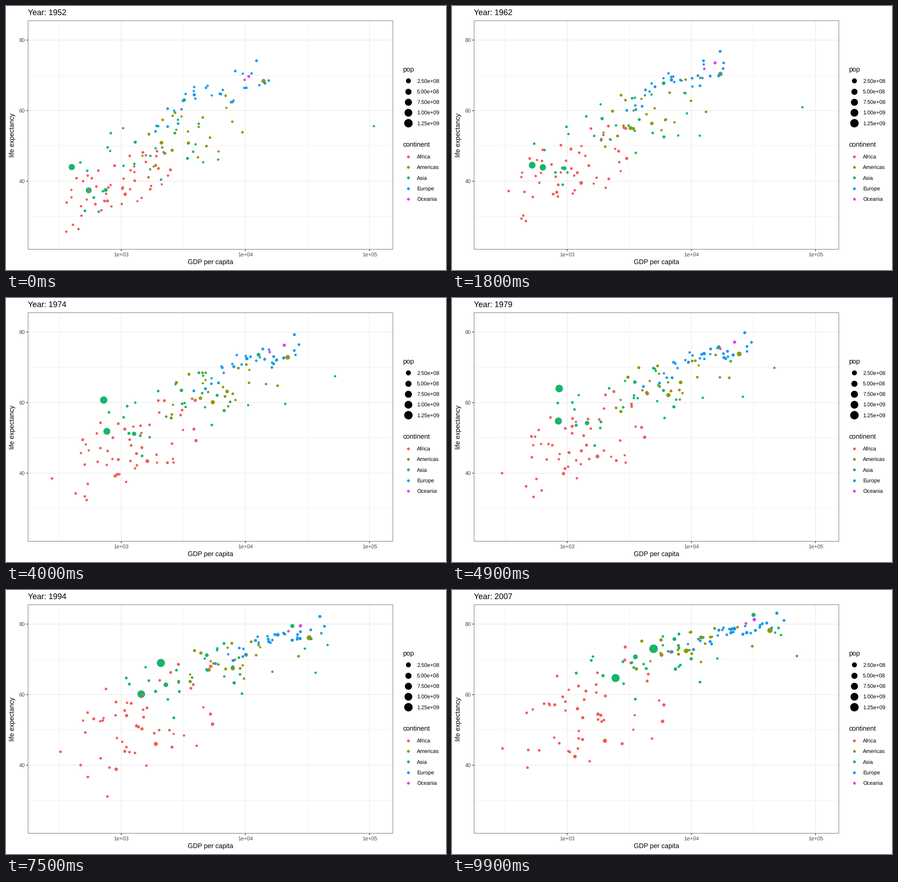
A matplotlib script for the animation above (10 s loop, 966 by 580 pixels).

```python
import numpy as np
import matplotlib.pyplot as plt
from matplotlib.animation import FuncAnimation
from matplotlib.patches import Rectangle

W, H, DPI = 966, 580, 72          # at 72 dpi one point is one pixel
FRAMES, SURVEYS = 100, 12         # nine frames from one survey to the next
LEFT, RIGHT, TOP, BOTTOM = 48.1, 849.6, 31.8, 534.8
THICK, THIN = 1.42, .71
GRID, DARK, GREY = '#EBEBEB', '#333333', '#4D4D4D'

COLORS = {
    'Africa': '#F35E5A',
    'Americas': '#929705',
    'Asia': '#17B56A',
    'Europe': '#149BF0',
    'Oceania': '#E345E8',
}

# Count, then (start, end) of mean log10 gdp, its spread, mean life, scatter.
CROWDS = {
    'Africa': (50, (2.97, 3.17), (.25, .34), (38.8, 54.5), (4.3, 7.5)),
    'Americas': (22, (3.56, 3.94), (.24, .24), (53.5, 73.5), (5, 2.7)),
    'Asia': (28, (3.19, 3.83), (.32, .45), (47, 70.5), (6.5, 4.2)),
    'Europe': (30, (3.72, 4.34), (.26, .21), (64.2, 77.7), (2.8, 1.2)),
    'Oceania': (2, (4.01, 4.47), (.01, .08), (69.2, 80.7), (.15, .1)),
}

# Largest bubbles: continent, final millions, (gdp, life) at start, middle, end.
GIANTS = [
    ('Asia', 1319, [(400, 44), (832, 64.7), (4959, 73)]),
    ('Asia', 1110, [(547, 37.4), (830, 55.3), (2452, 64.7)]),
    ('Americas', 301, [(13990, 68.4), (24400, 73.9), (42952, 78.2)]),
    ('Asia', 223, [(750, 37.5), (1440, 54.4), (3541, 70.7)]),
    ('Americas', 190, [(2109, 50.9), (6850, 62.3), (9066, 72.4)]),
    ('Africa', 135, [(1077, 36.3), (1790, 45.1), (2014, 46.9)]),
    ('Asia', 127, [(3217, 63), (17700, 76.1), (31656, 82.6)]),
    ('Americas', 109, [(3478, 50.8), (8450, 66.1), (11978, 76.2)]),
    ('Africa', 9, [(493, 40), (690, 44), (863, 46.2)]),
    ('Asia', 2.5, [(108382, 55.6), (44500, 70.3), (47307, 77.6)]),
]
# Sudden losses of life expectancy: bubble -> (survey, years)
DROPS = {0: (2, 7), 8: (8, 21)}

rng = np.random.default_rng(52)
time = np.linspace(0, 1, SURVEYS)
ease = time ** .7                 # progress is quicker early on


def px(log_gdp):
    return LEFT + (log_gdp - 2.2487) / 2.94 * (RIGHT - LEFT)


def py(life):
    return BOTTOM - (life - 20.649) / 64.904 * (BOTTOM - TOP)


def diameter(pop):
    return 4.7 + 14.2 * np.sqrt(np.asarray(pop) / 1319)


def drift(n):
    """Even scores that slowly reshuffle, with a little noise per survey."""
    ranks = np.linspace(-1.65, 1.65, n)
    turn = .6 * time[:, None]
    mix = rng.permutation(ranks) * np.cos(turn) + rng.permutation(ranks) * np.sin(turn)
    return mix + rng.normal(0, .1, (SURVEYS, n))


def crowd(n, *ranges):
    mean, sd, level, scatter = (a + (b - a) * ease[:, None] for a, b in ranges)
    dx = sd * drift(n)
    slope = 15 - 6 * time[:, None]
    return mean + dx, level + slope * dx + scatter * drift(n)


def giant(stops):
    return [np.interp(time, [0, .5, 1], v)[:, None]
            for v in zip(*((np.log10(gdp), life) for gdp, life in stops))]


tracks, pops, colors = [], [], []
for name, pop, stops in GIANTS:
    tracks.append(giant(stops))
    pops.append(pop)
    colors.append(COLORS[name])
for bubble, (survey, years) in DROPS.items():
    tracks[bubble][1][survey] -= years
for name, (n, *ranges) in CROWDS.items():
    tracks.append(crowd(n, *ranges))
    pops.extend(np.clip(rng.lognormal(2.5, 1, n), .3, 85))
    colors += [COLORS[name]] * n

log_gdp, life = (np.hstack(part) for part in zip(*tracks))
X, Y = px(log_gdp), py(life)
SIZE = diameter(np.outer(.4 + .6 * time, pops))

plt.rcParams.update({'font.family': 'Liberation Sans', 'text.hinting': 'none'})
fig = plt.figure(figsize=(W / DPI, H / DPI), dpi=DPI, facecolor='white')
ax = fig.add_axes([0, 0, 1, 1])
ax.set(xlim=(0, W), ylim=(H, 0))
ax.axis('off')


def line(x, y, color, width):
    ax.plot(x, y, color=color, lw=width, zorder=1, snap=False,
            solid_capstyle='butt')


def label(x, y, text, size=11.73, **kw):
    return ax.text(x, y, text, fontsize=size, va='baseline', **kw)


def disc(x, y, size, color, z=3):
    return ax.scatter(x, y, s=size ** 2, c=color, linewidths=0, zorder=z,
                      snap=False)


def legend(heading, top, rows):
    label(871.5, top, heading, 14.67)
    for i, (text, color, size) in enumerate(rows):
        y = top + 20.9 + 23.2 * i
        disc(883, y, size, color)
        label(902, y + 4.2, text)


for k in range(3):
    for x, y, width in ((3 + k, 40 + 20 * k, THICK), (2.5 + k, 30 + 20 * k, THIN)):
        line([px(x)] * 2, [TOP, BOTTOM], GRID, width)
        line([LEFT, RIGHT], [py(y)] * 2, GRID, width)
for k in range(3):
    x, y = px(3 + k), py(40 + 20 * k)
    line([x, x], [BOTTOM, BOTTOM + 3.67], DARK, THICK)
    line([LEFT - 3.67, LEFT], [y, y], DARK, THICK)
    label(x, 550, f'1e+0{3 + k}', color=GREY, ha='center')
    label(41.5, y + 4.2, f'{40 + 20 * k}', color=GREY, ha='right')

# Only the inner half of the panel border shows.
inset = THIN / 2
ax.add_patch(Rectangle((LEFT + inset, TOP + inset), RIGHT - LEFT - THIN,
                       BOTTOM - TOP - THIN, fill=False, ec=DARK, lw=THIN,
                       zorder=4, snap=False))

title = label(LEFT, 20, '', 17.6)
label((LEFT + RIGHT) / 2, 567, 'GDP per capita', 14.67, ha='center')
label(18, (TOP + BOTTOM) / 2, 'life expectancy', 14.67, ha='center',
      rotation=90, rotation_mode='anchor')
legend('pop', 143.5, [(f'{p * 1e6:.2e}', 'black', diameter(p))
                      for p in range(250, 1251, 250)])
legend('continent', 310, [(n, c, 6.2) for n, c in COLORS.items()])

dots = disc(X[0], Y[0], SIZE[0], colors)


def tween(keys, t):
    i = min(int(t), SURVEYS - 2)
    return keys[i] + (keys[i + 1] - keys[i]) * (t - i)


def draw(frame):
    t = frame * (SURVEYS - 1) / (FRAMES - 1)
    dots.set_offsets(np.column_stack([tween(X, t), tween(Y, t)]))
    dots.set_sizes(tween(SIZE, t) ** 2)
    title.set_text(f'Year: {round(1952 + 5 * t)}')
    return dots, title


anim = FuncAnimation(fig, draw, frames=FRAMES, interval=100, repeat=True,
                     repeat_delay=0, blit=False)
plt.show()
```
